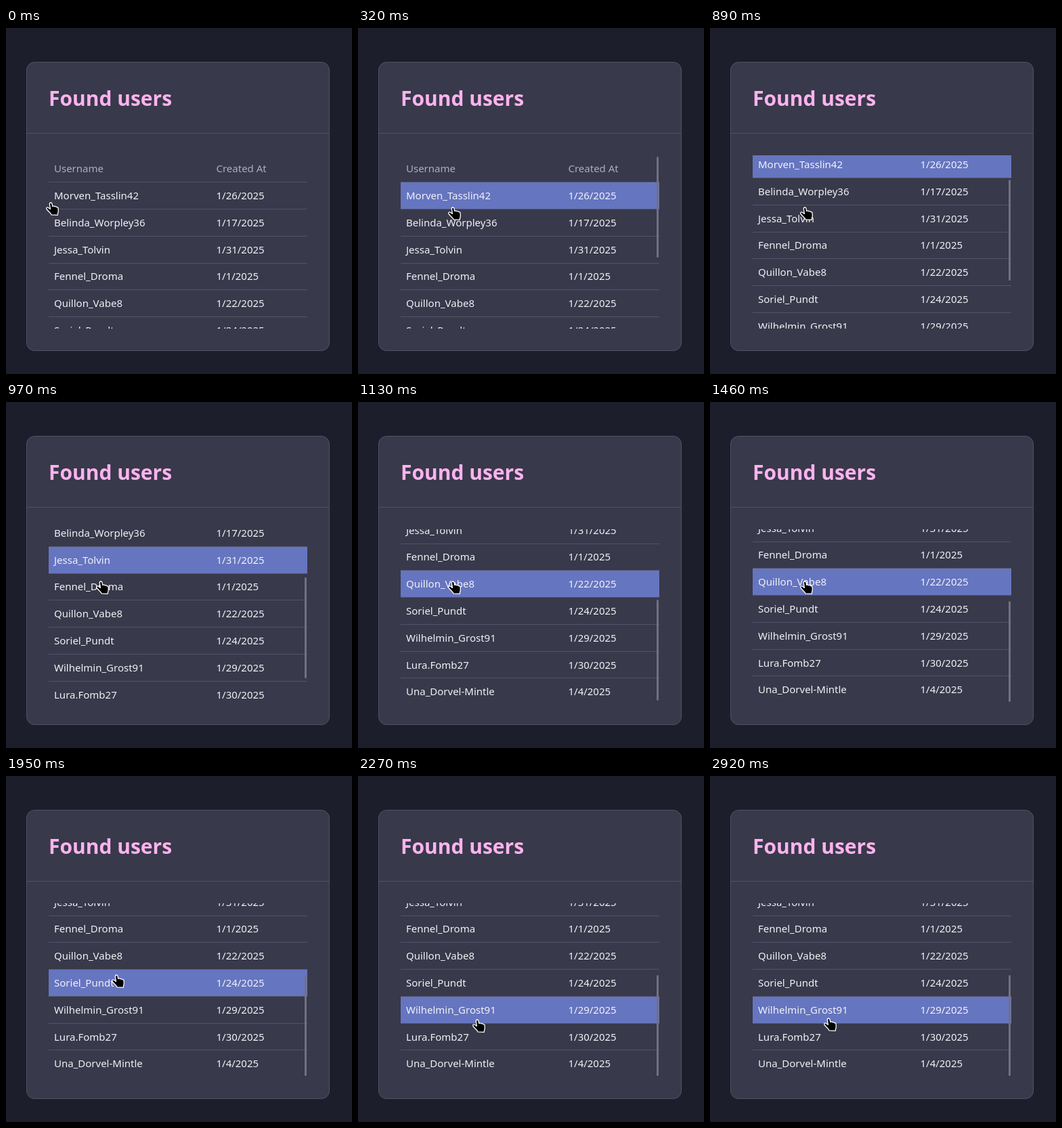
An HTML page that plays this animation: 511x511 px, repeating every 3000 ms.

```html
<!DOCTYPE html>
<html lang="en">
<head>
<meta charset="utf-8">
<title>Found users</title>
<style>
  * { box-sizing: border-box; }
  html, body { margin: 0; width: 100%; height: 100%; overflow: hidden; background: #1c1e2c; }
  body { position: relative; font: 15px "Noto Sans", sans-serif; color: #f1f1f6; cursor: default; }
  .card {
    position: absolute; left: 30px; top: 50px; width: 448px; height: 427px;
    background: #38394a; border: 1px solid #505165; border-radius: 12px;
  }
  h1 {
    margin: 0; height: 105px; padding: 33px 32px 0; border-bottom: 1px solid #505165;
    font-size: 30px; font-weight: 600; line-height: 40px; color: #ffb3ee;
  }
  .list {
    position: absolute; left: 63px; top: 188px; width: 382px; height: 256px; overflow: hidden;
  }
  .row {
    display: flex; height: 39.766px; padding-left: 8px; line-height: 39px;
    border-bottom: 1px solid #535468; white-space: nowrap;
  }
  .row span { position: relative; top: -0.125px; }
  .row span:first-child { width: 239.47px; }
  .row:last-child { border-bottom-color: transparent; }
  .head { height: 40.3px; color: #acadbd; }
  .hover { background: #6675c0; }
  .thumb {
    position: absolute; left: 441px; top: 190px; width: 3px; height: 149px;
    border-radius: 1.5px; background: #707184;
  }
  .pointer { position: absolute; left: 0; top: 0; width: 19px; height: 20px; overflow: visible; }
</style>
</head>
<body>
<div class="card"><h1>Found users</h1></div>
<div class="list">
  <div class="row head"><span>Username</span><span>Created At</span></div>
</div>
<div class="thumb"></div>
<svg class="pointer" viewBox="0 0 19 20">
  <path d="M5.3 3C5.1.7 8.4.2 8.9 2.4L9.8 6.4C10.8 5.5 12.3 5.8 12.8 6.8
    C13.9 6.2 15.2 6.6 15.6 7.6C16.9 7.3 18 8 18.1 9.4L18.3 13
    C18.3 15.2 17.4 16.2 17.2 19.3L8 18.9C7.6 16.8 4.2 14.6 1 10.5
    C0 8.8 1.7 7.1 3.4 8.3L6.4 10.4Z"
    fill="#000" stroke="#fff" stroke-width="1.3" stroke-linejoin="round"/>
</svg>
<script>
  const LOOP = 3000;
  const STEP = 80;
  const LIST_LEFT = 63;
  const FIRST_ROW = 228.3;
  const ROW_HEIGHT = 39.766;
  const THUMB_RATIO = 0.738;

  const users = [
    ["Morven_Tasslin42", 26], ["Belinda_Worpley36", 17], ["Jessa_Tolvin", 31],
    ["Fennel_Droma", 1], ["Quillon_Vabe8", 22], ["Soriel_Pundt", 24],
    ["Wilhelmin_Grost91", 29], ["Lura.Fomb27", 30], ["Una_Dorvel-Mintle", 4],
  ];

  const list = document.querySelector(".list");
  const thumb = document.querySelector(".thumb");
  const pointer = document.querySelector(".pointer");

  const rows = users.map(([name, day]) => {
    const row = document.createElement("div");
    row.className = "row";
    for (const text of [name, `1/${day}/2025`]) {
      row.appendChild(document.createElement("span")).textContent = text;
    }
    return list.appendChild(row);
  });

  const easeOut = (u, power = 2) => 1 - (1 - u) ** power;

  // Progress from 0 to 1 in a number of held steps, the first one taken at start
  function stepped(time, start, count, step = STEP) {
    const taken = Math.floor((time - start) / step) + 1;
    return Math.min(Math.max(taken / count, 0), 1);
  }

  function pointerAt(time) {
    const enter = easeOut(stepped(time, 80, 4));
    const descend = stepped(time, 1790, 7);
    const drift = stepped(time, 2760, 2, 160);
    return {
      x: Math.round(59 + 74 * enter + 36 * easeOut(descend, 1.82) - 0.6 * drift),
      y: Math.round(257 + 7 * enter + 95 * descend ** 1.4 - 2 * drift),
    };
  }

  function scrollAt(time) {
    const wheel = easeOut(stepped(time, 890, 4)) ** 1.33;
    return Math.round(138 * wheel + 3 * stepped(time, 1300, 3));
  }

  // The hover state trails the scrolling by one step
  function hoveredRow(time, { x, y }) {
    if (x < LIST_LEFT) return -1;
    return Math.floor((y + 2 - FIRST_ROW + scrollAt(time - STEP)) / ROW_HEIGHT);
  }

  function render(time) {
    const tip = pointerAt(time);
    const scroll = scrollAt(time);
    const hovered = hoveredRow(time, tip);
    list.scrollTop = scroll;
    thumb.style.top = `${190 + Math.round(scroll * THUMB_RATIO)}px`;
    thumb.style.visibility = hovered < 0 ? "hidden" : "visible";
    pointer.style.transform = `translate(${tip.x}px, ${tip.y}px)`;
    rows.forEach((row, i) => row.classList.toggle("hover", i === hovered));
  }

  const begin = performance.now();
  function tick() {
    render((performance.now() - begin) % LOOP);
    requestAnimationFrame(tick);
  }
  tick();
</script>
</body>
</html>
```
